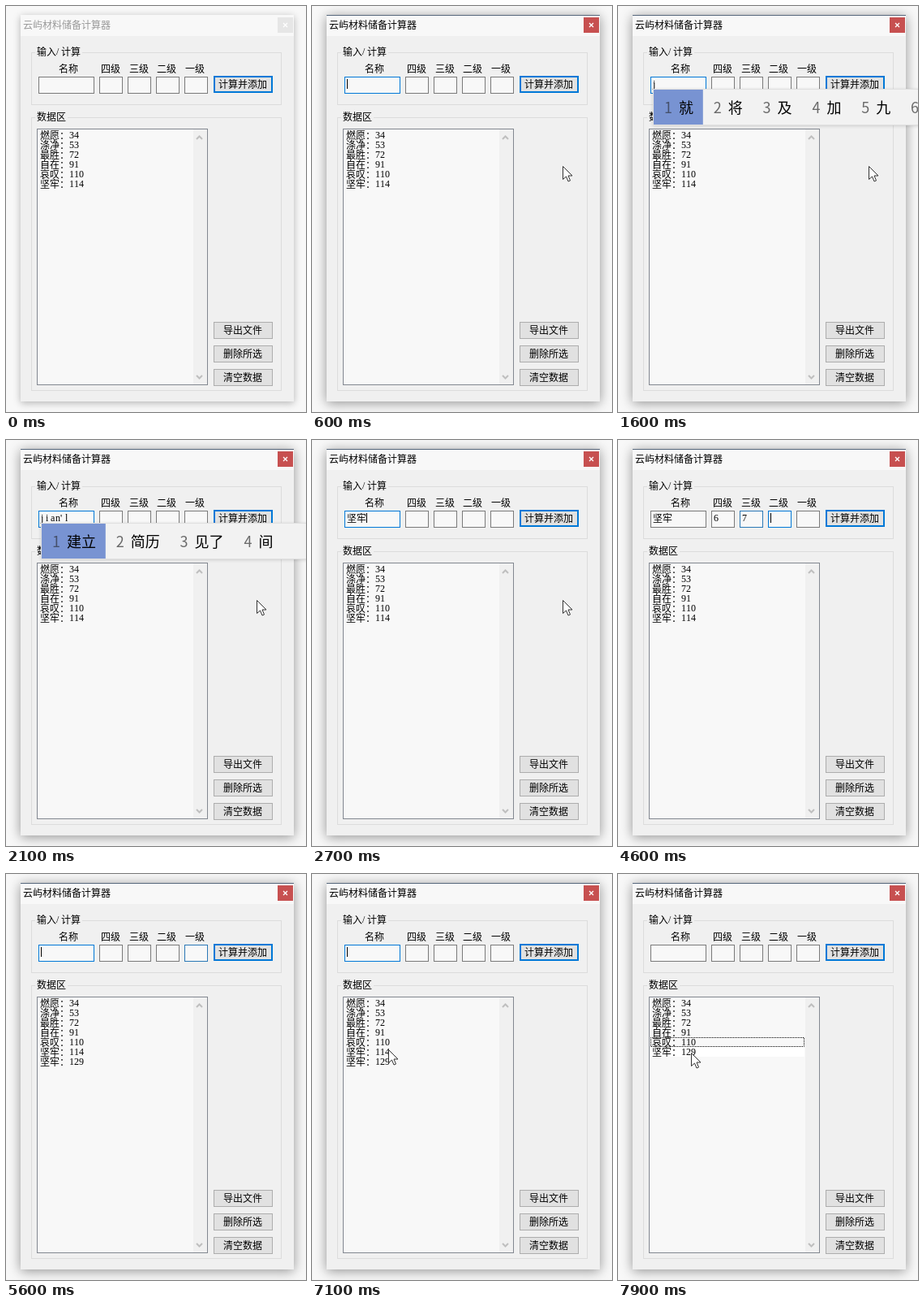
Write an HTML page with a canvas that moves like this. It is 370 by 500 pixels and loops after 8000 ms.

```html
<!DOCTYPE html>
<html lang="zh-CN">
<head>
<meta charset="utf-8">
<style>
  html, body { margin: 0; width: 100%; height: 100%; overflow: hidden; background: #f8f8f8; }
  canvas { display: block; }
</style>
</head>
<body>
<canvas id="stage" width="370" height="500"></canvas>
<script>
const ctx = document.getElementById('stage').getContext('2d');
const LOOP = 8000, BLUE = '#0078d7';
const CJK = '"Noto Sans CJK SC", "Noto Sans CJK", sans-serif';
const LATIN = '"Liberation Serif", serif';

// Each schedule lists [start time, value]; the value holds until the next entry.
const nameText = [[0, ''], [1600, 'j'], [1800, 'ji'], [1900, 'jia'], [2000, 'jian'],
  [2100, "jian'l"], [2200, "jian'la"], [2300, "jian'lao"], [2700, '坚牢'], [5200, '']];
const candidates = [[0, ''], [1600, '就 将 及 加 九 级'], [1800, '及 级 几 即 机 记'],
  [1900, '加 家 价 假 佳 夹'], [2000, '见 件 间 建 简 减'], [2100, '建立 简历 见了 间'],
  [2200, '艰难 见啦 捡 剪'], [2300, '坚牢 监牢 见老 建'], [2700, '']];
const focus = [[0, -1], [200, 0], [3400, 1], [4400, 2], [4600, 3], [5000, 4], [5600, 0], [7700, -1]];
const caret = [[0, 0], [300, 43], [1100, 0], [2700, 67], [3200, 118], [3600, 0], [4100, 124],
  [4400, 153], [4500, 159], [4600, 188], [4800, 194], [4900, 223], [5000, 229],
  [5200, 43], [6500, 0], [7000, 43], [7500, 0]];
const pointer = [[100, 75, 94], [200, 75, 94], [600, 309, 197], [4100, 309, 197],
  [5700, 305, 186], [6200, 305, 186], [6300, 303, 187], [6400, 303, 187],
  [7000, 96, 213], [7100, 94, 216], [7300, 90, 222], [7600, 90, 222], [7700, 90, 220], [8000, 90, 220]];

const fields = [
  { x: 40, w: 69, label: '名称', labelX: 65 },
  { x: 115, w: 29, label: '四级', labelX: 117, digit: '6', at: 4100 },
  { x: 150, w: 29, label: '三级', labelX: 152, digit: '7', at: 4500 },
  { x: 185, w: 29, label: '二级', labelX: 186, digit: '8', at: 4800 },
  { x: 220, w: 29, label: '一级', labelX: 221, digit: '9', at: 5000 }
];
const stock = ['燃愿：34', '涤净：53', '最胜：72', '自在：91', '哀叹：110', '坚牢：114'];
const arrow = new Path2D('M0 0V16L4 12.5L6.5 18.5L9 17.5L6.5 11.5H11.5Z');

const indexAt = (list, t) => list.findLastIndex(entry => entry[0] <= t);
const valueAt = (list, t) => list[indexAt(list, t)][1];

function rect(x, y, w, h, color) {
  ctx.fillStyle = color;
  ctx.fillRect(x, y, w, h);
}

function frame(x, y, w, h, color, thick = 1) {
  ctx.strokeStyle = color;
  ctx.lineWidth = thick;
  ctx.strokeRect(x + thick / 2, y + thick / 2, w - thick, h - thick);
}

function polyline(points, color) {
  ctx.strokeStyle = color;
  ctx.beginPath();
  points.forEach(([x, y]) => ctx.lineTo(x, y));
  ctx.stroke();
}

// Full-width characters advance 12px, half-width ones 6px.
function text(str, x, middle, color = '#000') {
  ctx.fillStyle = color;
  for (const ch of str) {
    const half = ch < '\u0100';
    ctx.font = `12px ${half ? LATIN : CJK}`;
    ctx.fillText(ch, x, middle + (half ? 4 : 4.5));
    x += half ? 6 : 12;
  }
}

function group(label, y, h, labelW) {
  frame(31, y, 309, h, '#dcdcdc');
  rect(36, y, labelW + 4, 1, '#f0f0f0');
  text(label, 38, y - 1);
}

function button(label, x, y, main) {
  rect(256, y, 73, 21, '#e1e1e1');
  frame(256, y, 73, 21, main ? BLUE : '#adadad', main ? 2 : 1);
  text(label, x, y + 10.5);
}

function drawWindow(active) {
  rect(0, 0, 370, 500, '#f8f8f8');
  ctx.save();
  ctx.shadowColor = active ? 'rgba(0,0,0,.42)' : 'rgba(0,0,0,.28)';
  ctx.shadowBlur = active ? 14 : 9;
  ctx.shadowOffsetY = 2;
  rect(18, 11, 337, 476, '#f0f0f0');
  ctx.restore();
  rect(18, 11, 337, 26, '#f8f8f8');
  if (active) rect(18, 11, 337, 1, '#56677c');
  text('云屿材料储备计算器', 21, 23, active ? '#000' : '#999');
  rect(335, 14, 19, 19, active ? '#c75050' : '#e6e6e6');
  ctx.lineWidth = 1.2;
  polyline([[342, 21], [347, 26]], '#fff');
  polyline([[347, 21], [342, 26]], '#fff');
}

function drawFields(t) {
  const step = indexAt(focus, t);
  const fading = .65 * (1 - (t - focus[step][0]) / 200);
  fields.forEach((f, i) => {
    text(f.label, f.labelX, 77);
    rect(f.x, 87, f.w, 21, '#f8f8f8');
    frame(f.x, 87, f.w, 21, '#7a7a7a');
    const glow = focus[step][1] === i ? 1 : step > 0 && focus[step - 1][1] === i ? fading : 0;
    if (glow > 0) {
      ctx.globalAlpha = glow;
      frame(f.x, 87, f.w, 21, BLUE);
      ctx.globalAlpha = 1;
    }
    if (f.digit && t >= f.at && t < 5200) text(f.digit, f.x + 3, 96);
  });
  text(valueAt(nameText, t), 43, 96);
  const caretX = valueAt(caret, t);
  if (caretX) rect(caretX, 90, 1, 12, '#000');
}

function drawList(t) {
  rect(38, 151, 211, 316, '#f8f8f8');
  rect(231, 152, 17, 314, '#f0f0f0');
  frame(38, 151, 211, 316, '#828790');
  ctx.lineWidth = 2;
  polyline([[235, 164], [238.5, 160.5], [242, 164]], '#bfbfbf');
  polyline([[235, 455], [238.5, 458.5], [242, 455]], '#bfbfbf');

  const deleted = t >= 7800, selected = t >= 7700 && !deleted;
  const rows = t < 5200 ? stock : [...(deleted ? stock.slice(0, 5) : stock), '坚牢：129'];
  if (selected) rect(40, 213, 190, 12, BLUE);
  if (deleted) {
    rect(40, 213, 190, 12, '#fff');
    ctx.setLineDash([1, 1]);
    ctx.lineDashOffset = .5;
    frame(40, 201, 190, 12, '#000');
    ctx.setLineDash([]);
  }
  rows.forEach((row, i) => text(row, 42, 159 + 12 * i, selected && i === 5 ? '#fff' : '#000'));
}

function drawCandidates(t) {
  const words = valueAt(candidates, t);
  if (!words) return;
  ctx.save();
  ctx.shadowColor = 'rgba(0,0,0,.15)';
  ctx.shadowBlur = 4;
  ctx.shadowOffsetY = 1;
  rect(43, 102, 340, 45, '#f2f2f2');
  ctx.restore();
  frame(43, 102, 340, 45, '#e0e0e0');
  let x = 57;
  words.split(' ').forEach((word, i) => {
    const width = 42.8 + 18 * word.length;
    if (i === 0) rect(44, 103, width, 43, '#7893d2');
    ctx.font = `18px ${CJK}`;
    ctx.fillStyle = i ? '#6a6a6a' : '#46516c';
    ctx.fillText(i + 1, x, 131.5);
    ctx.fillStyle = '#000';
    ctx.fillText(word, x + 18, 131.5);
    x += width;
  });
}

function drawPointer(t) {
  if (t < 100 || (t >= 4100 && t < 5700)) return;
  const i = indexAt(pointer, t);
  const [t0, x0, y0] = pointer[i], [t1, x1, y1] = pointer[i + 1];
  const k = (t - t0) / (t1 - t0);
  ctx.save();
  ctx.translate(Math.round(x0 + (x1 - x0) * k) + .5, Math.round(y0 + (y1 - y0) * k) + .5);
  ctx.fillStyle = '#fff';
  ctx.strokeStyle = '#333';
  ctx.lineWidth = 1;
  ctx.fill(arrow);
  ctx.stroke(arrow);
  ctx.restore();
}

function draw(now) {
  const t = Math.floor(now % LOOP / 100) * 100;
  drawWindow(t >= 200);
  group('输入/计算', 57, 65, 54);
  group('数据区', 137, 337, 36);
  drawFields(t);
  button('计算并添加', 262, 86, true);
  button('导出文件', 268, 389);
  button('删除所选', 268, 418);
  button('清空数据', 268, 447);
  drawList(t);
  drawCandidates(t);
  drawPointer(t);
}

const start = performance.now();
function tick() {
  draw(performance.now() - start);
  requestAnimationFrame(tick);
}
tick();
</script>
</body>
</html>
```
